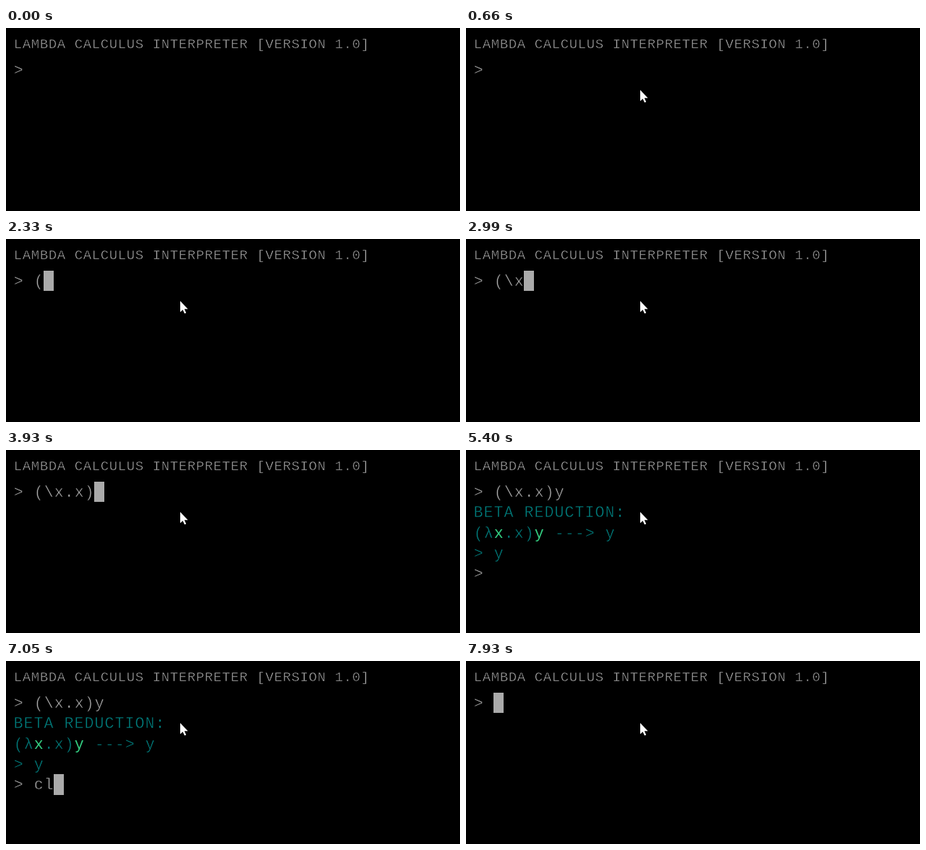
Recreate the animation shown at these times as an HTML page. Size 628x254 px, loop 8000 ms.

```html
<!DOCTYPE html>
<html lang="en">
<head>
<meta charset="utf-8">
<title>Lambda calculus interpreter</title>
<style>
  html, body { margin: 0; width: 100%; height: 100%; overflow: hidden; background: #000; }
  svg { display: block; }
  /* The black stroke thins the letters. */
  text {
    font: 21.6px "Liberation Mono", monospace;
    letter-spacing: 1.04px;
    white-space: pre;
    fill: #aaa;
    stroke: #000;
    stroke-width: 0.5px;
  }
  #title { font-size: 19px; letter-spacing: 0.6px; }
  #output text { fill: #008080; }
  #output .hot { fill: #33cc80; stroke: none; }
</style>
</head>
<body>
<svg width="628" height="254" viewBox="0 0 628 254">
  <rect width="628" height="254"/>
  <text id="title" x="10.8" y="28">LAMBDA CALCULUS INTERPRETER [VERSION 1.0]</text>
  <text id="first" x="10.8" y="65"></text>
  <g id="output">
    <text x="10.5" y="93">BETA REDUCTION:</text>
    <text x="10.8" y="122">(λ<tspan class="hot">x</tspan>.x)<tspan class="hot">y</tspan> ---&gt; y</text>
    <text x="10.8" y="150">&gt; y</text>
  </g>
  <text id="second" x="10.8" y="178"></text>
  <rect id="caret" width="14" fill="#aaa"/>
  <circle id="click" cx="240" cy="85" r="15" fill="#ff0" fill-opacity="0.47"/>
  <path id="pointer" fill="#fff" stroke="#000" stroke-width="1" paint-order="stroke"
        d="M0 0V15.5L3.5 12.2L6 17.6L8.2 16.6L5.8 11.3H10.6Z"/>
</svg>
<script>
const LOOP = 8000, CELL = 14, INPUT_X = 38;
const ENTER = 4860, CLEAR = 7930;
const $ = id => document.getElementById(id);

// Each entry: time, typed text, caret visible
const typing = [
  [0, "", false], [860, "", true], [1410, "", false], [1870, "", true],
  [2330, "(", true], [2590, "(\\", true], [2990, "(\\x", true],
  [3120, "(\\x.", true], [3400, "(\\x.x", true], [3930, "(\\x.x)", true],
  [4460, "(\\x.x)", false], [4590, "(\\x.x)y", true],
  [ENTER, "", true], [5400, "", false], [5860, "", true], [6390, "", false],
  [6850, "", true], [6980, "c", true], [7050, "cl", true],
  [7320, "cle", true], [7450, "clea", true], [7520, "clear", true],
  [CLEAR, "", true]
];

const MOVE_START = 450, MOVE_STEP = 70, MOVE_STEPS = 3;
const from = { x: 394, y: 181 }, to = { x: 241, y: 86 };

function show(el, on) {
  el.setAttribute("visibility", on ? "visible" : "hidden");
}

function drawPointer(t) {
  const step = Math.min(MOVE_STEPS, Math.floor((t - MOVE_START) / MOVE_STEP));
  const rest = (1 - Math.max(0, step) / MOVE_STEPS) ** 1.4;
  const x = to.x + (from.x - to.x) * rest;
  const y = to.y + (from.y - to.y) * rest;
  $("pointer").setAttribute("transform", `translate(${x} ${y})`);
  show($("pointer"), t >= MOVE_START);
  show($("click"), t >= 860 && t < 1060);
}

function draw(t) {
  const [, typed, caretOn] = typing.findLast(s => s[0] <= t);
  const evaluated = t >= ENTER && t < CLEAR;

  $("first").textContent = "> " + (evaluated ? "(\\x.x)y" : typed);
  $("second").textContent = evaluated ? "> " + typed : "";
  show($("output"), evaluated);

  const caret = $("caret");
  caret.setAttribute("x", INPUT_X + typed.length * CELL);
  caret.setAttribute("y", evaluated ? 157 : 44);
  caret.setAttribute("height", evaluated ? 29 : 28);
  show(caret, caretOn);

  drawPointer(t);
}

const start = performance.now();
function tick() {
  draw((performance.now() - start) % LOOP);
  requestAnimationFrame(tick);
}
tick();
</script>
</body>
</html>
```
